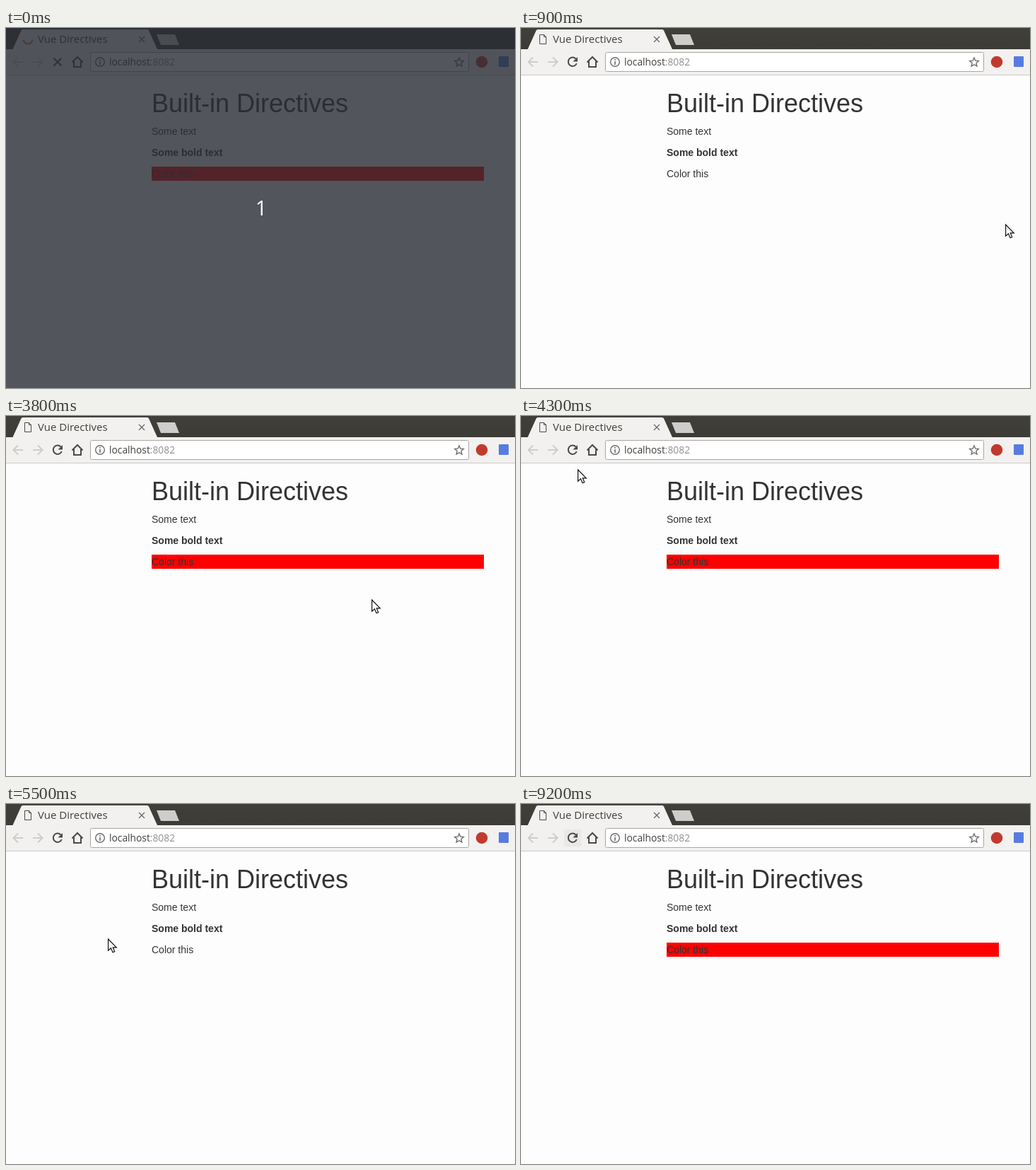
Write an HTML page that moves like this. It is 720 px wide and 509 px high and loops after 9500 ms.

```html
<!DOCTYPE html>
<html lang="en">
<head>
<meta charset="utf-8">
<title>Built-in Directives</title>
<style>
  html, body { margin: 0; width: 100%; height: 100%; overflow: hidden; background: #fdfdfd; }
  svg, .ui, .page { position: absolute; left: 0; top: 0; }
  svg { width: 720px; height: 509px; }
  .ui { font: 15px/20px "Open Sans", "Noto Sans", sans-serif; color: #3f3e3b; white-space: pre; }
  .ui i { font-style: normal; color: #8f8f8f; }
  .page { left: 206px; top: 87px; width: 470px; font: 14px/20px "Liberation Sans", Arial, sans-serif; color: #333; }
  h1 { margin: 0 0 10px; font-size: 36px; font-weight: normal; line-height: 39px; }
  p { margin: 0 0 10px; }
  .red { background: #f00; }
  .line { fill: none; stroke: #4b4a48; stroke-width: 2; }
  .thin { stroke: #6b6b6b; stroke-width: 1.4; }
  .off { stroke: #cfcdca; }
</style>
</head>
<body>
<svg viewBox="0 0 720 509">
  <!-- tab strip -->
  <linearGradient id="strip" x2="0" y2="1">
    <stop stop-color="#403f39"/><stop offset="1" stop-color="#3c3b36"/>
  </linearGradient>
  <rect width="720" height="30" fill="url(#strip)"/>
  <rect y="30" width="720" height="36" fill="#f2f1ef"/>
  <rect y="66" width="720" height="1" fill="#cbcac8"/>
  <path d="M9.500 30L21.500 3.500Q22 2 24 2H199.500Q201.500 2 202 3.500L214 30Z" fill="#f2f1ef"/>
  <path d="M213 9H239L245 24H219Z" fill="#cecdcb"/>
  <path class="line thin" d="M188 12l8 8m0-8l-8 8"/>
  <path id="doc" class="line" d="M26.500 9.500H32.500L35.500 12.500V22.500H26.500ZM32.500 9.500V12.500H35.500" style="stroke-width:1"/>
  <circle id="spin" cx="31" cy="16" r="6.300" pathLength="360" fill="none" stroke="#df7040" stroke-width="2.200"/>

  <!-- toolbar -->
  <path class="line off" d="M24 48H11M17 41.500L10.500 48L17 54.500"/>
  <path class="line off" d="M38 48H51M45 41.500L51.500 48L45 54.500"/>
  <rect id="hover" x="61" y="36" width="24" height="24" rx="2" fill="#e9e8e6"/>
  <g id="reload">
    <path class="line" d="M77.500 43.500A6.200 6.200 0 1 0 78.800 50"/>
    <path d="M80 41V47.500H73.500Z" fill="#4b4a48"/>
  </g>
  <path id="stop" class="line" d="M67.500 42.500l11 11m0-11l-11 11"/>
  <path class="line" d="M93.500 48.500L101 41L108.500 48.500M96 47V55H106V47"/>
  <rect x="119.500" y="34.500" width="535" height="27" rx="2" fill="#fff" stroke="#a9a8a5"/>
  <circle class="line thin" cx="133" cy="48" r="6.300"/>
  <path d="M132.200 44h1.600v1.700h-1.600zM132.200 47h1.600v5h-1.600z" fill="#6b6b6b"/>
  <path class="line thin" d="M641 42L642.800 46.200L647.300 46.600L643.900 49.600L644.900 54L641 51.700L637.100 54L638.100 49.600L634.700 46.600L639.200 46.200Z"/>
  <circle cx="673" cy="48" r="8.300" fill="#c13a2e"/>
  <rect x="697" y="40" width="14" height="15" rx="1" fill="#577be0"/>
</svg>

<div class="ui" style="left:45px;top:5px">Vue Directives</div>
<div class="ui" style="left:146px;top:38px;font-size:13.8px">localhost<i>:8082</i></div>

<div class="page">
  <h1>Built-in Directives</h1>
  <p>Some text</p>
  <p><b>Some bold text</b></p>
  <p id="tinted">Color this</p>
</div>

<svg viewBox="0 0 720 509">
  <path id="cursor" d="M.6 1V17.200L4.400 13.700L7 19.800L9.700 18.600L7.200 12.800H12.200Z" fill="#fff" stroke="#111" stroke-width="1.200"/>
  <g id="cover">
    <rect width="720" height="509" fill="#282c34" opacity=".8"/>
    <text x="361" y="265" text-anchor="middle" font-size="29" fill="#fff" font-family="Open Sans, Noto Sans, sans-serif">1</text>
  </g>
</svg>

<script>
const LOOP = 9500, STEP = 100, RELOAD = 5000, LOAD_TIME = 500, TINT_DELAY = 3400;
const $ = id => document.getElementById(id);
const show = (id, on) => $(id).setAttribute("visibility", on ? "visible" : "hidden");
const within = (t, a, b) => t >= a && t < b;
const clamp = k => Math.min(1, Math.max(0, k));
const ease = k => k * k * (3 - 2 * k);

// Pointer moves: arrival time, duration, place
const moves = [
  [3600, 200, 625, 304], [4300, 700, 80, 75], [4400, 100, 77, 57],
  [5300, 300, 144, 190], [8500, 100, 116, 156], [9000, 400, 78, 20]
];

function pointer(t) {
  let x = 685, y = 277;
  for (const [end, length, toX, toY] of moves) {
    const k = ease(clamp((t - end + length) / length));
    x += (toX - x) * k;
    y += (toY - y) * k;
  }
  return [Math.round(x), Math.round(y)];
}

function drawSpinner(turn) {
  const start = 5 + 15 * turn * turn;
  const sweep = 165 + 120 * Math.sin(turn * Math.PI / 3);
  $("spin").setAttribute("stroke-dasharray", `${sweep} ${360 - sweep}`);
  $("spin").setAttribute("transform", `rotate(${start} 31 16)`);
}

function draw(now) {
  const t = Math.floor(now % LOOP / STEP) * STEP;
  const since = t % RELOAD;
  const loading = since < LOAD_TIME;

  // The page is blank one step after a reload and tinted again after a delay
  const tinted = since < STEP || since >= TINT_DELAY + (t < RELOAD ? 0 : STEP);
  $("tinted").className = tinted ? "red" : "";

  show("cover", t < STEP);
  show("hover", within(t, 4700, RELOAD) || t >= 9100);
  show("doc", !loading);
  show("reload", !loading);
  show("spin", loading);
  show("stop", loading);
  drawSpinner(Math.min(since / STEP, 3));

  show("cursor", within(t, 900, 4700) || within(t, 5100, 9100));
  $("cursor").setAttribute("transform", `translate(${pointer(t)})`);
}

const begin = performance.now();
function tick() {
  draw(performance.now() - begin);
  requestAnimationFrame(tick);
}
tick();
</script>
</body>
</html>
```
